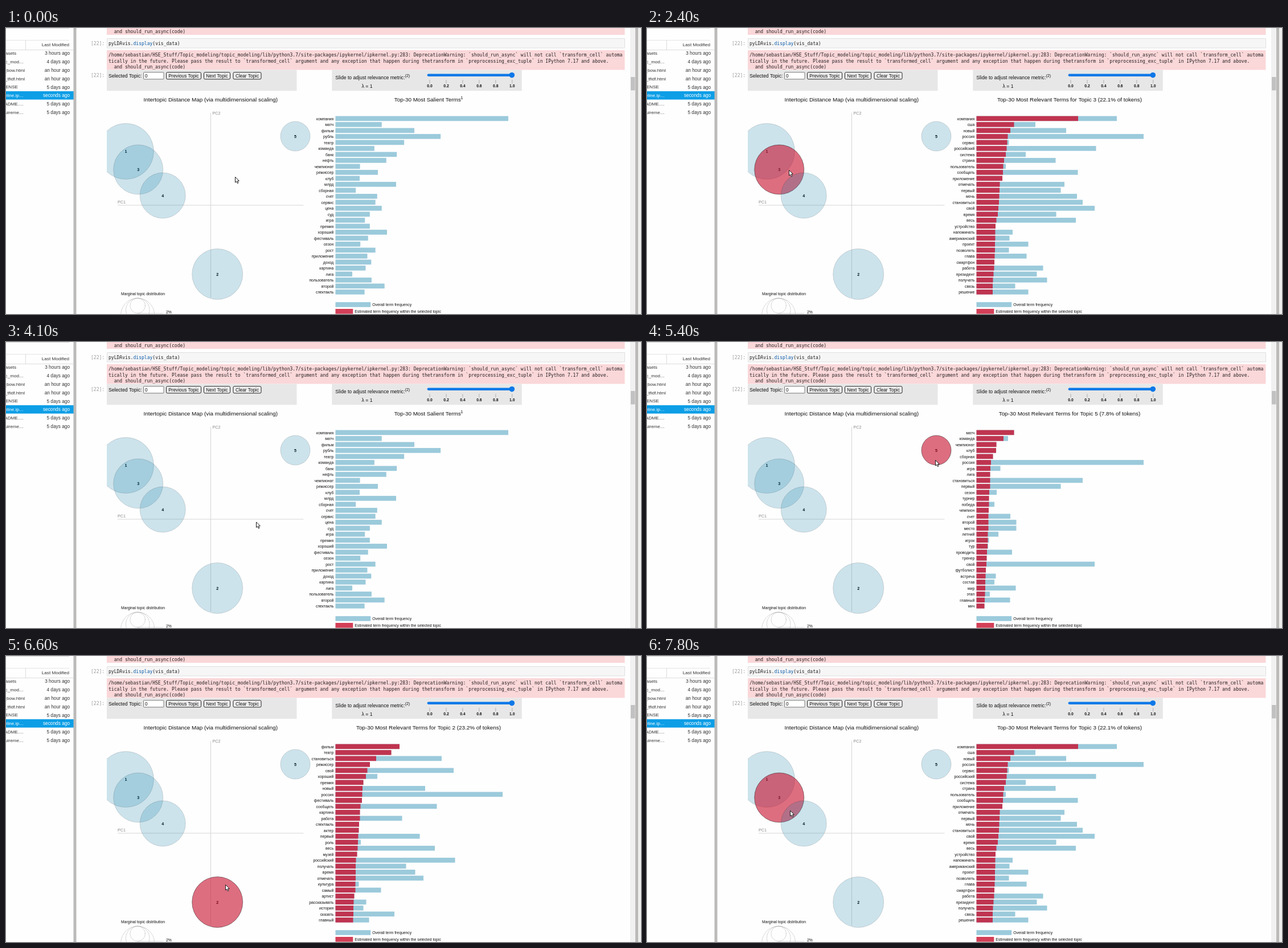
Write an HTML page with a canvas that moves like this. It is 1115 by 502 pixels and loops after 8000 ms.

```html
<!DOCTYPE html>
<html lang="en">
<head>
<meta charset="utf-8">
<title>Topic model explorer</title>
<style>
html, body { margin: 0; width: 100%; height: 100%; overflow: hidden; background: #fefefe; }
canvas { display: block; width: 1115px; height: 502px; }
</style>
</head>
<body>
<canvas id="stage"></canvas>
<script>
const W = 1115, H = 502, LOOP = 8000, STEP = 100;
const SANS = '"Liberation Sans", Arial, sans-serif';
const MONO = '"DejaVu Sans Mono", monospace';
const BLUE = 'rgba(5,122,165,', RED = 'rgba(200,15,45,';
const canvas = document.getElementById('stage');
const ctx = canvas.getContext('2d');
const dpr = window.devicePixelRatio || 1;
canvas.width = W * dpr;
canvas.height = H * dpr;

// Per topic: share of tokens and "term, width in topic, overall width if wider".
const topics = {
  1: { share: '28', terms: 'рубль 142 150,россия 114 293.5,банк 87.5,млн 86 108,млрд 81 86.5,нефть 72.5,российский 71 210,рф 67 143.5,составлять 64 85,цена 63.5 66,доллар 63 84.5,мочь 62 176.5,компания 59 246.5,рост 57,рынок 56.5 70,тыс 52 70,уровень 52 64.5,данные 51.5 108,доход 51,страна 50 139,отмечать 49.5 154.5,экономика 45,правительство 43 62.5,весь 42 174.5,сообщать 40.5 178,объем 39 44,новый 39 157.5,число 37.5 79.5,средство 37 46.5,мера 35 51' },
  2: { share: '23.2', terms: 'фильм 112.5,театр 98,становиться 71.5 186.5,режиссер 60.5,свой 56 207.5,хороший 53.5 73.5,премия 49,новый 47.5,россия 47,фестиваль 46.5,сообщать 44,картина 43,работа 43 117,спектакль 41.5,актер 41,первый 40 148,роль 39.5 44.5,весь 39,музей 38,российский 36,получать 35.5 124,время 35.5 140,отмечать 35.5,культура 35 41,самый 35 80,артист 33,рассказывать 32 54,история 31.5 49,сказать 31.5 103.5,главный 31 59' },
  3: { share: '22.1', terms: 'компания 178.5,сша 66 103.5,новый 59.5,россия 55,сервис 54 57,российский 53,система 51.5 86.5,страна 48.5,пользователь 47 51.5,сообщать 46.5,приложение 45.5,отмечать 41,первый 40.5,мочь 40,становиться 39.5,свой 38.5,время 37.5,весь 35,устройство 33.5,напоминать 33 63.5,американский 33 58,проект 32.5 91,позволять 32.5 57,глава 32 88,смартфон 31.5,работа 31,президент 30 106,получать 29,связь 28.5 68,решение 28.5 91' },
  4: { share: '18.9', terms: 'президент 64,сказать 58,россия 52,российский 50,суд 49,глава 48,сообщать 46,украина 45 52,человек 44 98,дело 42 58,страна 40,власть 39 47,мочь 38,решение 37,сша 36,полиция 35,закон 34 40,первый 33,время 33,слово 32 56,область 31 44,самый 30,гражданин 30 36,министр 29 41,заявлять 29 50,весь 28,отмечать 28,военный 27 33,сотрудник 27 49,право 26 38' },
  5: { share: '7.8', terms: 'матч 66,команда 47.5 55.5,чемпионат 35,клуб 34.5,сборная 29,россия 25.5,игра 24.5 42,лига 24,становиться 24,первый 24,сезон 22.5 35.5,турнир 22,победа 22 31.5,чемпион 21.5,счет 21 59.5,второй 21 70,место 21 70,летний 20 38.5,игрок 20 22,тур 19.5 20.5,проводить 18.5 62.5,тренер 18,свой 17.5,футболист 16.5,встреча 16 34,состав 15.5 31.5,мир 15.5 69,этап 15 23.5,главный 14.5,мяч 14' }
};
const salient = 'компания матч фильм рубль театр команда банк нефть чемпионат режиссер клуб млрд сборная счет сервис цена суд игра премия хороший фестиваль сезон рост приложение доход картина лига пользователь второй спектакль'.split(' ');
const SALIENT_SCALE = 1.231;

const overall = {};
for (const topic of Object.values(topics)) {
  topic.rows = topic.terms.split(',').map(entry => {
    const [term, own, total = own] = entry.split(' ');
    overall[term] = Math.max(overall[term] || 0, +total);
    return { term, own: +own };
  });
}

const bubbles = [
  { id: 1, x: 210.4, y: 216.5, r: 49 },
  { id: 2, x: 371.2, y: 432, r: 44.5 },
  { id: 3, x: 232.2, y: 248.5, r: 43.5 },
  { id: 4, x: 275.2, y: 294, r: 40 },
  { id: 5, x: 508, y: 190, r: 26 }
];

// Hovered topic from each time on; 0 is none.
const hovers = [[0, 0], [700, 1], [1600, 3], [2500, 4], [3400, 2], [4000, 0], [4400, 5],
  [5600, 0], [6100, 2], [6700, 0], [6900, 4], [7700, 3]];

// Pointer moves: start, end, target x, target y.
const moves = [
  [300, 400, 384, 258], [500, 800, 209, 188], [900, 1000, 208, 187], [1300, 1400, 211, 192],
  [1500, 1600, 232, 238], [1700, 1800, 232, 263], [2300, 2400, 249, 249], [2600, 2700, 276, 283],
  [2900, 3000, 275, 283], [3100, 3400, 371, 425], [3600, 3700, 372, 426], [3700, 4500, 506, 205],
  [4500, 4600, 506, 207], [5400, 6200, 411, 420], [6200, 6300, 410, 422], [6400, 6600, 385, 401],
  [6600, 7000, 283, 302], [7400, 7800, 251, 271]
];

function pointerAt(t) {
  let x = 402, y = 261;
  for (const [from, to, tx, ty] of moves) {
    if (t <= from) break;
    const u = Math.min(1, (t - from) / (to - from));
    const k = u * u * (3 - 2 * u);
    x += (tx - x) * k;
    y += (ty - y) * k;
  }
  return [x, y];
}

function hoverAt(t) {
  let id = 0;
  for (const [from, topic] of hovers) if (t >= from) id = topic;
  return id;
}

// y is the middle of the capitals.
function text(str, x, y, size, { color = '#111', align = 'left', font = SANS, weight = '' } = {}) {
  ctx.font = `${weight} ${size}px ${font}`;
  ctx.fillStyle = color;
  ctx.textAlign = align;
  ctx.fillText(str, x, y + size * 0.355);
}

function rect(x, y, w, h, color) {
  ctx.fillStyle = color;
  ctx.fillRect(x, y, w, h);
}

function line(x1, y1, x2, y2, color, width = 1) {
  ctx.strokeStyle = color;
  ctx.lineWidth = width;
  ctx.beginPath();
  ctx.moveTo(x1, y1);
  ctx.lineTo(x2, y2);
  ctx.stroke();
}

function circle(x, y, r) {
  ctx.beginPath();
  ctx.arc(x, y, r, 0, Math.PI * 2);
}

function box(x, y, w, h, radius, fill, stroke) {
  ctx.beginPath();
  ctx.roundRect(x, y, w, h, radius);
  ctx.fillStyle = fill;
  ctx.fill();
  ctx.strokeStyle = stroke;
  ctx.lineWidth = 1;
  ctx.stroke();
}

function drawFiles() {
  line(0, 0.5, 111, 0.5, '#d4d4d4');
  line(0, 21.5, 111, 21.5, '#e4e4e4');
  line(0, 38.5, 118, 38.5, '#dcdcdc');
  line(34.5, 21, 34.5, 38, '#dcdcdc');
  text('Last Modified', 111, 29, 8.1, { align: 'right', color: '#333' });
  const files = [
    ['datasets', 18, '3 hours ago'], ['topic_mod…', 31, '4 days ago'],
    ['vis_bow.html', 33, 'an hour ago'], ['vis_tfidf.html', 33, 'an hour ago'],
    ['LICENSE', 21, '5 days ago'], ['pipeline.ip…', 31, 'seconds ago'],
    ['README.…', 31, '5 days ago'], ['requireme…', 31, '5 days ago']
  ];
  files.forEach(([name, end, age], i) => {
    const y = 44.3 + i * 14.82, active = i === 5;
    if (active) rect(0, y - 7.4, 119, 14.6, '#0d9ee6');
    const style = { align: 'right', color: active ? '#fff' : '#333' };
    text(name, end, y, 8.1, style);
    text(age, 112, y, 8.3, style);
  });
  rect(118.5, 0, 5, H, '#bcbab9');
}

function drawScrollbar() {
  rect(1096, 0, 9, H, '#f1f1f1');
  rect(1097, 86, 7.5, 23.5, '#c2c1c1');
  rect(1105, 0, 5, H, '#bcbab9');
  rect(1110, 0, 5, H, '#eeeeee');
}

function drawCells() {
  const code = (str, x, y, color = '#242020') => text(str, x, y, 8.03, { font: MONO, color });
  const pink = '#fad7d9', prompt = '#9a9a9a';
  const tail = 'tically in the future. Please pass the result to `transformed_cell` argument and any exception that happen during thetransform in `preprocessing_exc_tuple` in IPython 7.17 and above.';
  rect(177, 0, 909.5, 12, pink);
  code(tail, 180, -4.5);
  code('  and should_run_async(code)', 180, 6.3);

  code('[22]:', 149, 27, prompt);
  box(177.5, 18.5, 909, 16.5, 0, '#f6f6f6', '#e0e0e0');
  code('pyLDAvis.', 180, 27);
  code('display', 180 + 9 * 4.835, 27, '#0a5aa8');
  code('(vis_data)', 180 + 16 * 4.835, 27);

  rect(177, 39, 909.5, 34.5, pink);
  code('/home/sebastian/HSE_Stuff/Topic_modeling/topic_modeling/lib/python3.7/site-packages/ipykernel/ipkernel.py:283: DeprecationWarning: `should_run_async` will not call `transform_cell` automa', 180, 47.5);
  code(tail, 180, 58);
  code('  and should_run_async(code)', 180, 68.5);
  code('[22]:', 149, 83, prompt);
}

function drawControls() {
  const gray = '#e7e7e7';
  rect(177, 73.5, 333.5, 36.8, gray);
  rect(572.3, 73.5, 333.5, 36.8, gray);
  text('Selected Topic:', 180, 83.5, 8.65);
  box(241.5, 77.8, 35.5, 12, 1, '#fff', '#777');
  text('0', 244, 83.8, 8.23);
  for (const [label, x, w] of [['Previous Topic', 281, 62], ['Next Topic', 347, 47], ['Clear Topic', 398.5, 50]]) {
    box(x + 0.5, 77.8, w - 1, 12, 2, '#efefef', '#222');
    text(label, x + w / 2, 83.8, 8.23, { align: 'center' });
  }

  text('Slide to adjust relevance metric:', 578.3, 86.8, 8.65);
  text('(2)', 700.8, 84, 6.8);
  text('λ = 1', 624.5, 102, 8.65);
  box(740, 81, 149, 3.4, 1.7, '#0b78e8', '#0b78e8');
  circle(888.3, 82.7, 4.8);
  ctx.fillStyle = '#0b78e8';
  ctx.fill();
  for (let i = 0; i <= 5; i++) {
    const x = 744 + i * 28.95;
    line(x, 91, x, 97.5, '#999', 0.7);
    text((i / 5).toFixed(1), x, 102, 6.8, { align: 'center', weight: 'bold' });
  }
}

function drawMap(active) {
  text('Intertopic Distance Map (via multidimensional scaling)', 359.3, 125.4, 9.9, { align: 'center' });
  line(359.5, 149, 359.5, 473, '#d6d6d6');
  line(196, 311, 522.5, 311, '#d6d6d6');
  text('PC2', 362.5, 149.4, 7.2, { color: '#888' });
  text('PC1', 196, 305.6, 7.2, { color: '#888' });

  ctx.save();
  ctx.beginPath();
  ctx.rect(177, 110, 400, H);
  ctx.clip();
  for (const b of bubbles) text(b.id, b.x, b.y + 0.3, 7.2, { align: 'center', weight: 'bold', color: '#000' });
  for (const b of bubbles) {
    const on = b.id === active;
    circle(b.x, b.y, b.r);
    ctx.fillStyle = on ? RED + '0.6)' : BLUE + '0.2)';
    ctx.fill();
    ctx.strokeStyle = on ? 'rgba(0,0,0,0.6)' : 'rgba(0,0,0,0.2)';
    ctx.lineWidth = 0.7;
    ctx.stroke();
  }
  ctx.restore();

  text('Marginal topic distribution', 202, 466.5, 6.8);
  ctx.setLineDash([1.3, 1.3]);
  for (const share of [2, 5, 10]) {
    const r = 9.3 * Math.sqrt(share);
    circle(231.2, 474.3 + r, r);
    ctx.strokeStyle = '#8a8a8a';
    ctx.lineWidth = 0.7;
    ctx.stroke();
  }
  line(231, 500.8, 276, 500.8, '#aaa', 0.7);
  ctx.setLineDash([]);
  text('2%', 281, 498.3, 6.8);
}

function drawBars(active) {
  const topic = topics[active];
  const x = 578.5, height = 8.6;
  if (topic) {
    text(`Top-30 Most Relevant Terms for Topic ${active} (${topic.share}% of tokens)`, 742, 125.4, 9.9, { align: 'center' });
  } else {
    text('Top-30 Most Salient Terms', 681.7, 125.4, 9.9);
    text('1', 798.3, 122.3, 7.4);
  }
  const rows = topic ? topic.rows : salient.map(term => ({ term, own: 0 }));
  rows.forEach(({ term, own }, i) => {
    const y = 158.9 + i * 10.5;
    rect(x, y - height / 2, overall[term] * (topic ? 1 : SALIENT_SCALE), height, BLUE + '0.4)');
    if (own) rect(x, y - height / 2, own, height, RED + '0.8)');
    text(term, 575.3, y + 0.4, 6.8, { align: 'right' });
  });
  rect(x, 481.2, 61.7, height, BLUE + '0.4)');
  text('Overall term frequency', 643.3, 485.3, 6.8);
  rect(x, 493, 30.8, height, RED + '0.8)');
  text('Estimated term frequency within the selected topic', 612.3, 497.6, 6.8);
}

function drawPointer(x, y) {
  ctx.save();
  ctx.translate(x + 0.5, y + 0.5);
  ctx.beginPath();
  [[0, 0], [0, 9.6], [2.2, 7.6], [3.8, 11.2], [5.5, 10.4], [3.9, 7], [6.8, 6.8]].forEach(p => ctx.lineTo(...p));
  ctx.closePath();
  ctx.fillStyle = '#fff';
  ctx.fill();
  ctx.strokeStyle = '#1c1c1c';
  ctx.lineWidth = 1;
  ctx.stroke();
  ctx.restore();
}

function draw(now) {
  const t = Math.floor((now % LOOP) / STEP) * STEP;
  const active = hoverAt(t);
  ctx.setTransform(dpr, 0, 0, dpr, 0, 0);
  rect(0, 0, W, H, '#fefefe');
  drawFiles();
  drawCells();
  drawControls();
  drawMap(active);
  drawBars(active);
  drawScrollbar();
  drawPointer(...pointerAt(t));
  requestAnimationFrame(draw);
}
requestAnimationFrame(draw);
</script>
</body>
</html>
```
